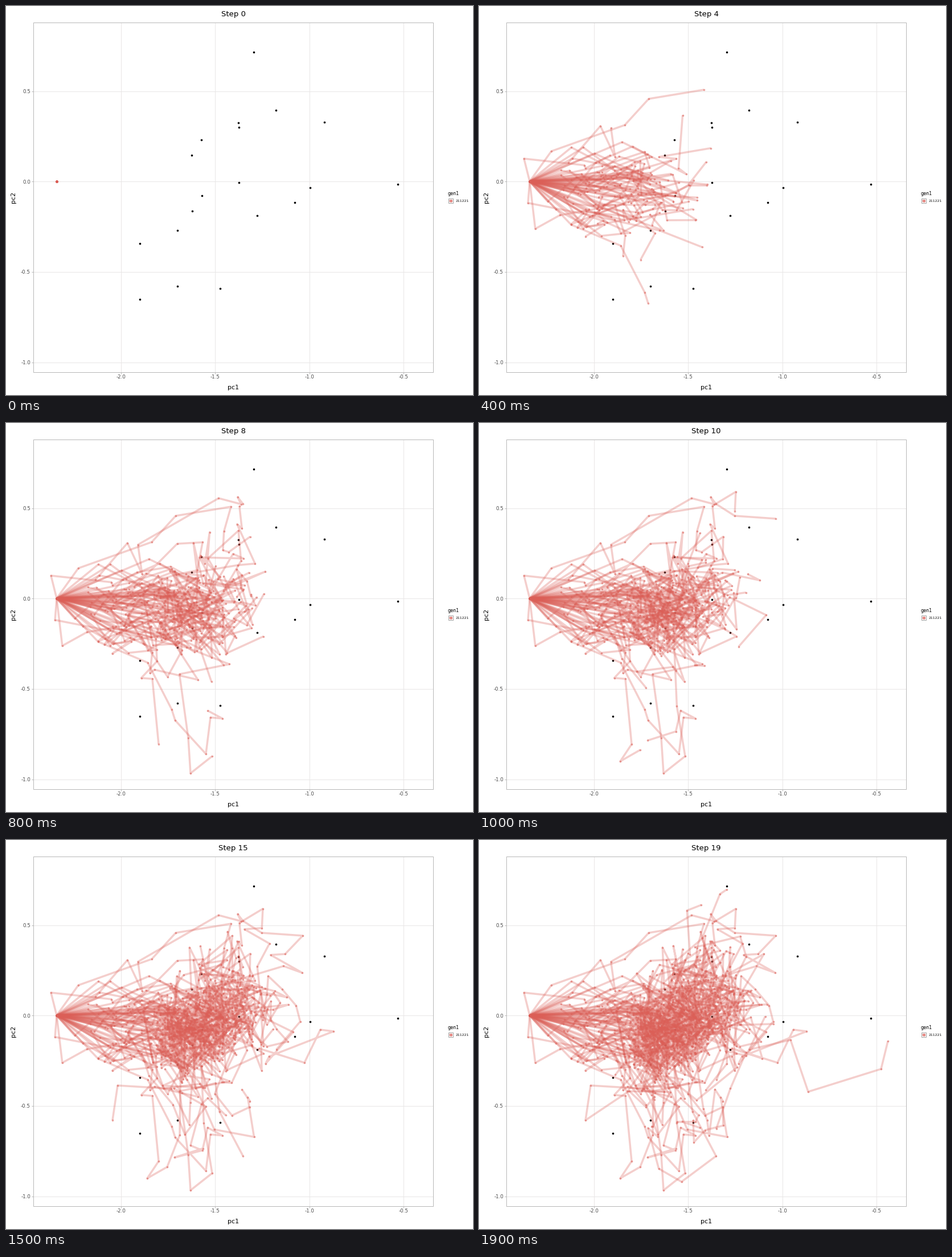
Write a matplotlib script that moves like this. It is 820 by 683 pixels and loops after 2 s.

```python
import matplotlib.pyplot as plt
import numpy as np
from matplotlib.animation import FuncAnimation
from matplotlib.patches import Rectangle

W, H, DPI = 820, 683, 64
PT = 72 / DPI                     # points per pixel
STEPS, WALKERS = 20, 62
RED, GRID, EDGE, GREY = "#db5f57", "#e8e6e6", "#b8b8b8", "#4d4d4d"
START = np.array([89.0, 308.0])

plt.rcParams["font.family"] = "DejaVu Sans"

BLACK_DOTS = [
    (434.5, 80.5), (474, 182.5), (559, 204), (408, 205.3), (409, 212.5),
    (343, 235), (326, 262.3), (409, 310.3), (533.5, 318.5), (688, 313),
    (343.5, 333), (507, 345.3), (441, 367.8), (326.7, 360.2), (300.7, 394.2),
    (235, 416.8), (301, 492), (376, 495.5), (235.3, 514.7),
]

# Places the walkers gather around.
HUBS = np.array([(345, 325), (300, 388), (402, 285),
                 (442, 312), (370, 510), (412, 212)], float)

# Wide excursions: first step, then one key point per step.
TRIPS = [
    (1, [(79, 268)]),
    (1, [(127, 255), (256, 209), (298, 163), (395, 147)]),
    (3, [(291, 503), (297, 522), (351, 581), (359, 517)]),
    (6, [(320, 553), (324, 615), (362, 585)]),
    (8, [(268, 564), (248, 594), (283, 574)]),
    (8, [(416, 142), (449, 163), (521, 168)]),
    (11, [(462, 380), (575, 336), (552, 333), (524, 391)]),
    (14, [(196, 431), (187, 492)]),
    (16, [(547, 351), (578, 442), (706, 402), (718, 353)]),
    (18, [(423, 95), (435, 87)]),
]


def walk(seed=8):
    """Positions of every walker at every step, shape (STEPS, WALKERS, 2)."""
    rng = np.random.default_rng(seed)

    def near_hub(point):
        chance = np.exp(-np.hypot(*(HUBS - point).T) / 70)
        return rng.choice(len(HUBS), p=chance / chance.sum())

    pos = np.empty((STEPS, WALKERS, 2))
    pos[0] = START
    hub = np.array([near_hub((335, 340)) for _ in range(WALKERS)])
    trip = {}                     # walker -> points still to visit
    for n in range(1, STEPS):
        if n > 4:
            for i in np.flatnonzero(rng.random(WALKERS) < 0.22):
                hub[i] = near_hub(pos[n - 1, i])
        jitter = np.clip(rng.standard_t(5, (WALKERS, 2)), -3, 3)
        spread = (27, 22) if n < 5 else (25, 27)
        pos[n] = pos[n - 1] + 0.37 * (HUBS[hub] - pos[n - 1]) + jitter * spread

        # The nearest free walker sets out on each trip that begins now.
        for points in (list(p) for first, p in TRIPS if first == n):
            away = np.hypot(*(pos[n - 1] - points[0]).T)
            away[list(trip)] = np.inf
            trip[int(np.argmin(away))] = points
        for i in list(trip):
            pos[n, i] = trip[i].pop(0)
            if not trip[i]:
                del trip[i]
    return pos


paths = walk()

fig = plt.figure(figsize=(W / DPI, H / DPI), dpi=DPI, facecolor="white")
ax = fig.add_axes([0, 0, 1, 1])
ax.set_xlim(0, W)
ax.set_ylim(H, 0)
ax.axis("off")


def label(x, y, text, size, color="black", ha="center", va="baseline", **kw):
    return ax.text(x, y, text, fontsize=size * PT, color=color, ha=ha, va=va, **kw)


def stroke(xs, ys, color, width=1, **kw):
    return ax.plot(xs, ys, color=color, lw=width * PT, solid_capstyle="butt", **kw)[0]


def dots(points, radius, color, **kw):
    x, y = np.transpose(points)
    return ax.scatter(x, y, s=(2 * radius * PT) ** 2, color=color, linewidths=0, **kw)


# Panel, grid and axis labels
for k in range(4):
    x, y = 202 + 165.4 * k, 149.5 + 158.8 * k
    stroke([x, x], [29, 643], GRID, zorder=1)
    stroke([x, x], [643, 646], EDGE, zorder=1)
    label(x, 654.3, f"-{2 - k / 2}", 8.8, GREY)
    stroke([48, 750], [y, y], GRID, zorder=1)
    stroke([45, 48], [y, y], EDGE, zorder=1)
    label(43, y + 3.2, f"{0.5 - k / 2}", 8.8, GREY, ha="right")
ax.add_patch(Rectangle((48, 29), 702, 614, fill=False, ec=EDGE, lw=PT, zorder=6))
label(399, 673, "pc1", 11)
label(13, 336.5, "pc2", 11, va="center", rotation=90)
title = label(399, 18, "", 13.2)

# Legend
label(776, 331.5, "gen1", 8, ha="left")
ax.add_patch(Rectangle((777, 337.5), 7.5, 8, fc="white", ec="#8c8c8c", lw=0.8 * PT))
stroke([777.5, 784], [341.5, 341.5], RED, 3.5, alpha=0.3, zorder=3)
dots([(780.8, 341.5)], 2.6, RED, alpha=0.65, zorder=4)
label(789.3, 343.6, "211221", 6, ha="left")

# Data
dots(BLACK_DOTS, 1.8, "black", zorder=2)
trails = [stroke([], [], RED, 3.5, alpha=0.3, solid_joinstyle="round", zorder=3)
          for _ in range(WALKERS)]
marks = dots([START], 1.8, RED, alpha=0.55, zorder=4)


def draw(n):
    title.set_text(f"Step {n}")
    for i, trail in enumerate(trails):
        trail.set_data(paths[:n + 1, i].T)
    marks.set_offsets(paths[:n + 1].reshape(-1, 2))
    return [title, marks, *trails]


anim = FuncAnimation(fig, draw, frames=STEPS, init_func=lambda: draw(0),
                     interval=100, repeat=True, repeat_delay=0, blit=False)
plt.show()
```
